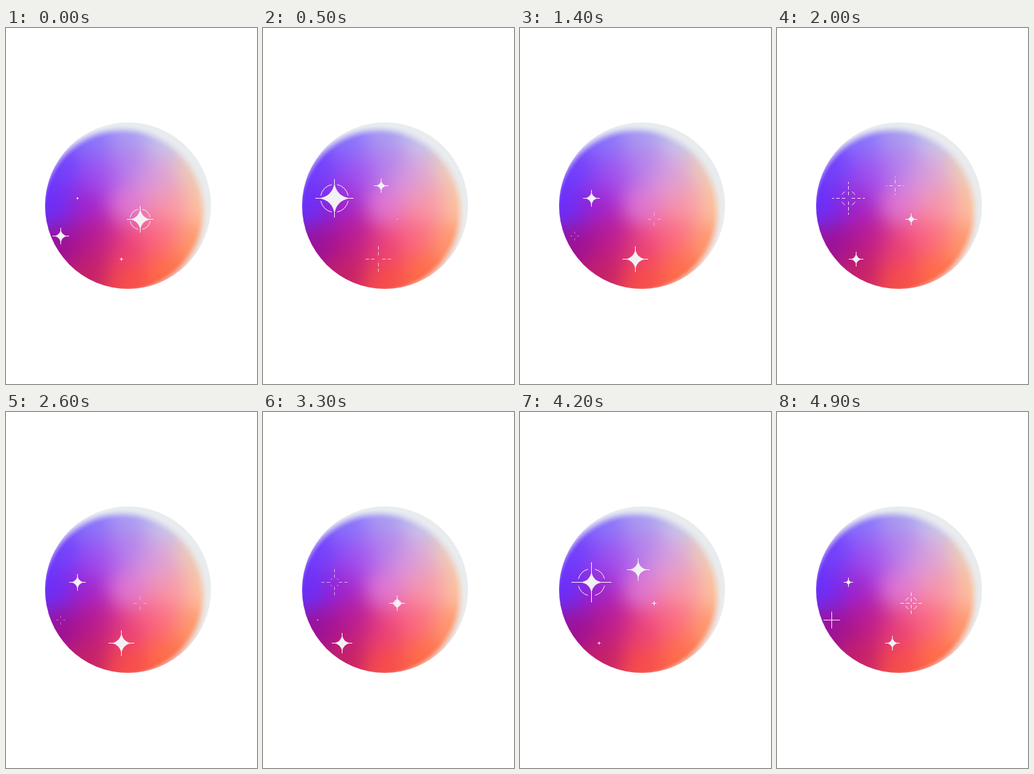
Recreate the animation shown at these times as an HTML page with a canvas. Size 360x509 px, loop 5000 ms.

```html
<!DOCTYPE html>
<html lang="en">
<head>
<meta charset="utf-8">
<title>Sparkling sphere</title>
<style>
html, body { margin: 0; width: 100%; height: 100%; overflow: hidden; background: #fff; }
canvas { display: block; width: 360px; height: 509px; }
</style>
</head>
<body>
<canvas id="stage" width="360" height="509"></canvas>
<script>
const LOOP = 5000, STEP = 100, CYCLE = 12;
const CX = 175, CY = 254, R = 119, BLUR = 23;
const PALE = [232, 236, 239];
const ctx = document.getElementById('stage').getContext('2d');

const rgb = hex => [1, 3, 5].map(i => parseInt(hex.slice(i, i + 2), 16));
const clamp = v => Math.min(1, Math.max(0, v));
const smooth = (v, lo, hi) => {
  const t = clamp((v - lo) / (hi - lo));
  return t * t * (3 - 2 * t);
};

// Colours spread evenly round a ring, clockwise from the right
const ring = (radius, colours) => colours.split(' ').map((hex, i, all) => {
  const a = i / all.length * Math.PI * 2;
  return { x: radius * Math.cos(a), y: radius * Math.sin(a), c: rgb(hex) };
});

const glows = [
  ...ring(108, '#fcc8a0 #ff9a6a #ff6e46 #f84e48 #c4206a #9c1096 #6830fc #7040fc #8874fc #a8a2f2 #c6c8ec #eed0b8'),
  ...ring(60, '#f898a8 #fb6884 #ec4076 #ba1a8e #a020cc #a04eee #b480ec #dc9cda'),
  ...ring(0, '#e27ad2')
];

function colourAt(x, y) {
  const sum = [0, 0, 0];
  let total = 0;
  for (const g of glows) {
    const w = Math.exp(-((g.x - x) ** 2 + (g.y - y) ** 2) / (2 * BLUR * BLUR));
    total += w;
    g.c.forEach((v, i) => sum[i] += v * w);
  }
  // Pale crescent along the upper right
  const rim = smooth(Math.hypot(x + 8, y - 8), 108, 124);
  return sum.map((v, i) => v / total * (1 - rim) + PALE[i] * rim);
}

function makeSphere() {
  const half = R + 2, size = half * 2;
  const sphere = document.createElement('canvas');
  sphere.width = sphere.height = size;
  const g = sphere.getContext('2d'), img = g.createImageData(size, size);
  for (let y = 0, p = 0; y < size; y++) {
    for (let x = 0; x < size; x++, p += 4) {
      img.data.set([...colourAt(x - half + 0.5, y - half + 0.5), 255], p);
    }
  }
  g.putImageData(img, 0, 0);
  return sphere;
}

// Birth, peak and end are steps of the cycle; beyond 12 they wrap round
const sparks = [
  { x: 165, y: 330, size: 28, birth: -0.3, peak: 3.2, end: 6 },
  { x: 102, y: 243, size: 29, birth: -0.3, peak: 5.3, end: 10.5, halo: true },
  { x: 192, y: 273, size: 19, birth: 4.8, peak: 12, end: 14.5, halo: true },
  { x: 78, y: 297, size: 13, birth: 8.8, peak: 12.3, end: 14.3 },
  { x: 169, y: 225, size: 18, birth: 3.3, peak: 6.3, end: 9 },
  { x: 113, y: 330, size: 18, birth: 5.5, peak: 9.8, end: 11.9 }
];

function star(r) {
  const c = r * 0.12;
  ctx.beginPath();
  ctx.moveTo(0, -r);
  ctx.quadraticCurveTo(c, -c, r, 0);
  ctx.quadraticCurveTo(c, c, 0, r);
  ctx.quadraticCurveTo(-c, c, -r, 0);
  ctx.quadraticCurveTo(-c, -c, 0, -r);
  ctx.fill();
}

// A spark swells into a star, then breaks up into a fading dashed cross
function drawSpark(s, step) {
  const now = step < s.birth || step + CYCLE < s.end ? step + CYCLE : step;
  if (now < s.birth || now >= s.end) return;
  const grow = clamp((now - s.birth) / (s.peak - s.birth));
  const fade = clamp((now - s.peak) / (s.end - s.peak));
  const body = s.size * 0.82 * grow * Math.max(0, 1 - 2.5 * fade);
  const ray = s.size * grow * (1 - 0.7 * fade ** 2);
  const gap = body ? 0 : s.size * 0.3 * fade;
  const halo = s.halo ? s.size * 0.77 * grow ** 2 * (1 - fade) : 0;
  const arc = 0.6 * (1 - fade);

  ctx.save();
  ctx.translate(s.x + 0.5, s.y + 0.5);
  ctx.fillStyle = ctx.strokeStyle = '#f2f0f5';
  ctx.globalAlpha = 1 - fade ** 3;
  star(body);
  for (let q = 0; q < 4; q++) {
    ctx.setLineDash(gap ? [5, 3] : []);
    ctx.beginPath();
    ctx.moveTo(gap, 0);
    ctx.lineTo(ray, 0);
    ctx.stroke();
    ctx.setLineDash([]);
    ctx.beginPath();
    ctx.arc(0, 0, halo, Math.PI / 4 - arc, Math.PI / 4 + arc);
    ctx.stroke();
    ctx.rotate(Math.PI / 2);
  }
  ctx.restore();
}

const sphere = makeSphere();

function draw(step) {
  ctx.fillStyle = '#fff';
  ctx.fillRect(0, 0, 360, 509);
  ctx.save();
  ctx.beginPath();
  ctx.arc(CX, CY, R, 0, Math.PI * 2);
  ctx.clip();
  ctx.drawImage(sphere, CX - R - 2, CY - R - 2);
  for (const s of sparks) drawSpark(s, step);
  ctx.restore();
}

const start = performance.now();
function frame() {
  const t = (performance.now() - start) % LOOP;
  draw(Math.floor(t / STEP) % CYCLE);
  requestAnimationFrame(frame);
}
frame();
</script>
</body>
</html>
```
